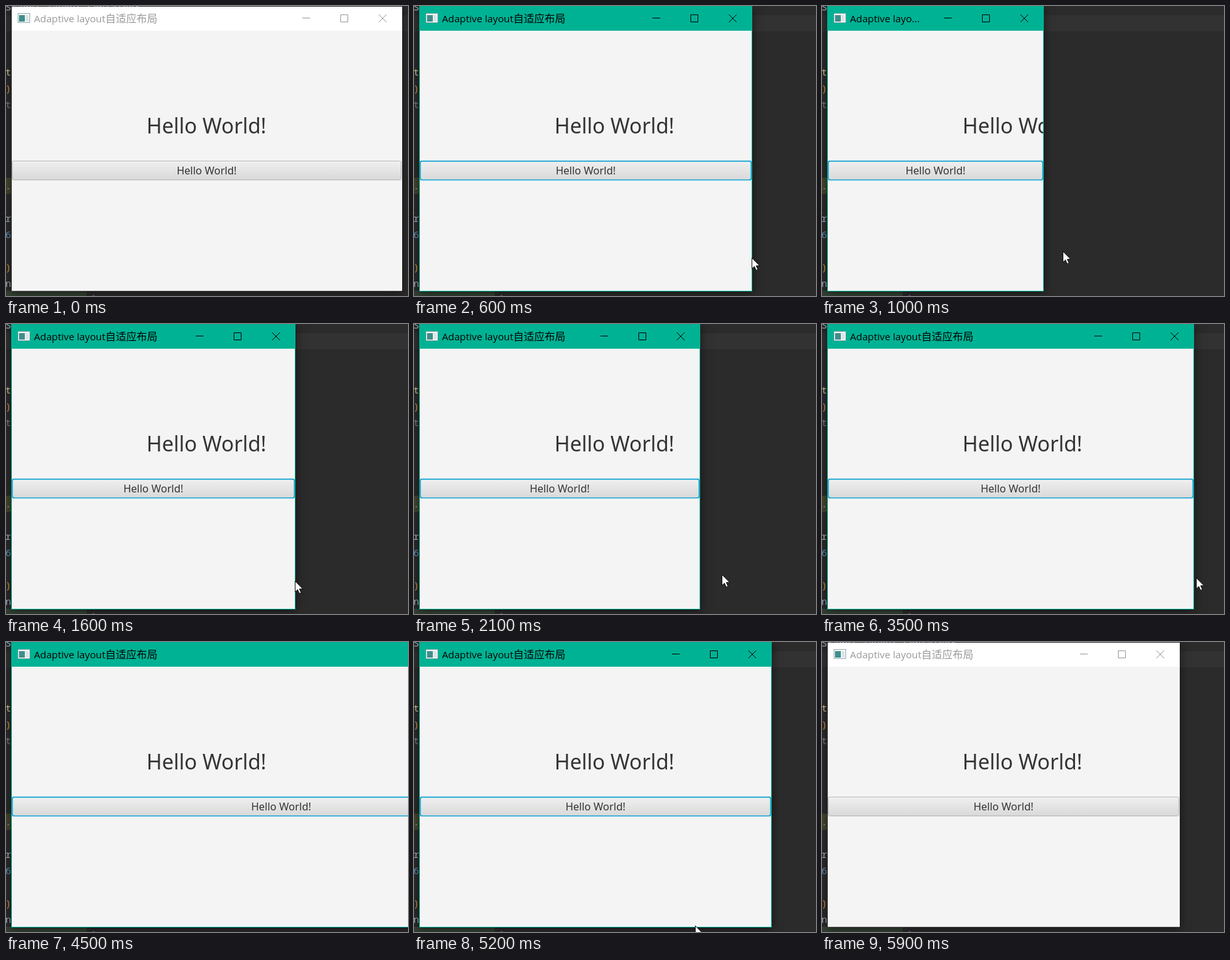
An HTML page with a canvas that plays this animation: 618x446 px, repeating every 6 s.

```html
<!DOCTYPE html>
<html lang="en">
<head>
<meta charset="utf-8">
<title>Adaptive layout</title>
<style>
  html, body { margin: 0; width: 100%; height: 100%; overflow: hidden; background: #2b2b2b; }
  canvas { display: block; }
</style>
</head>
<body>
<canvas id="stage" width="618" height="446"></canvas>
<script>
const ctx = document.getElementById('stage').getContext('2d');
const LOOP = 6000, STEP = 100;
const LEFT = 8, BOTTOM = 439, BAR = 38;
const TITLE = 'Adaptive layout自适应布局';
const LATIN = '15.2px "Open Sans", sans-serif';
const CJK = '16px "Noto Sans CJK SC", "Noto Sans CJK", sans-serif';
const BODY = '"Noto Sans", sans-serif';
const CODE = '15px "Noto Sans Mono", monospace';

// [time, right edge of the window]
const EDGE = [
  [400, 609], [500, 590], [600, 520], [700, 430], [800, 345], [900, 305],
  [1000, 341], [1100, 430], [1200, 530], [1300, 608], [1400, 600], [1500, 520],
  [1600, 445], [1700, 370], [1800, 300], [1900, 282], [2000, 340], [2200, 540],
  [2300, 605], [2400, 590], [2500, 500], [2600, 390], [2700, 314], [2800, 299],
  [3000, 450], [3100, 515], [3500, 572], [3600, 581], [3700, 627], [3900, 627],
  [4400, 815], [4500, 838], [4600, 700], [4700, 546], [4800, 550]
];
// [time, height of the pointer tip]
const POINTER_Y = [[400, 392], [1000, 377], [1600, 395], [2700, 373], [3500, 390], [4800, 392]];

// [text, baseline, colour]
const CODE_LINES = [
  ['Stage; layout.Container', 7, '#a9b7c6'],
  ['t)', 107, '#d8c690'], [');', 132, '#dc9a3c'], ['ti', 157, '#808080'],
  ['..', 282, '#a9a68a'], ['rF', 332, '#a9b7c6'], ['60', 357, '#6897bb'],
  [');', 407, '#dc9a3c'], ['ne', 432, '#a9b7c6']
];

function sample(keys, t) {
  const i = keys.findIndex(key => key[0] > t);
  if (i === 0) return keys[0][1];
  if (i < 0) return keys[keys.length - 1][1];
  const [t0, a] = keys[i - 1], [t1, b] = keys[i];
  return a + (b - a) * (t - t0) / (t1 - t0);
}

function rect(x, y, w, h, fill) {
  ctx.fillStyle = fill;
  ctx.fillRect(x, y, w, h);
}

function label(text, x, y, font, fill, align = 'left') {
  ctx.font = font;
  ctx.fillStyle = fill;
  ctx.textAlign = align;
  ctx.fillText(text, x, y);
}

function roundRect(x, y, w, h, r, fill) {
  ctx.fillStyle = fill;
  ctx.beginPath();
  ctx.roundRect(x, y, w, h, r);
  ctx.fill();
}

function drawEditor() {
  rect(0, 0, 618, 446, '#2b2b2b');
  rect(0, 14, 618, 25, '#323232');
  rect(0, 264, 9, 25, '#45452f');
  rect(0, 438, 124, 8, '#344134');
  for (const [text, y, fill] of CODE_LINES) label(text, -1, y, CODE, fill);
  rect(133, 445, 3, 1, '#777');
}

function drawTitle(limit, fill) {
  const runs = text => text.match(/[ -~]+|[^ -~]+/g) || [];
  const fontOf = run => run[0] <= '~' ? LATIN : CJK;
  const width = text => runs(text).reduce((sum, run) => {
    ctx.font = fontOf(run);
    return sum + ctx.measureText(run).width;
  }, 0);
  let text = TITLE;
  for (let n = TITLE.length - 1; n > 0 && width(text) > limit; n--) {
    text = TITLE.slice(0, n) + '...';
  }
  let x = 43;
  for (const run of runs(text)) {
    label(run, x, 25, fontOf(run), fill);
    x += ctx.measureText(run).width;
  }
}

function drawAppIcon() {
  rect(18, 11, 19, 15, '#8fa9ad');
  rect(19, 12, 17, 13, '#fff');
  rect(20, 14, 9, 10, '#3f8f8c');
  rect(30, 14, 5, 10, '#dde5e6');
}

function drawControls(right, stroke) {
  const min = right - 153.5, max = right - 94.5, close = right - 36;
  ctx.strokeStyle = stroke;
  ctx.lineWidth = 1;
  ctx.beginPath();
  ctx.moveTo(min, 18.5);
  ctx.lineTo(min + 12, 18.5);
  ctx.rect(max, 13.5, 11, 11);
  ctx.moveTo(close, 13);
  ctx.lineTo(close + 12, 25);
  ctx.moveTo(close + 12, 13);
  ctx.lineTo(close, 25);
  ctx.stroke();
}

function drawButton(right, active) {
  const x = LEFT + 1, w = right - 1 - x;
  const face = ctx.createLinearGradient(0, 239, 0, 267);
  face.addColorStop(0, '#efefef');
  face.addColorStop(1, '#d9d9d9');
  if (active) {
    roundRect(x - 1, 237, w + 2, 32, 4, 'rgba(3,158,211,.22)');
    roundRect(x, 238, w, 30, 3, '#0c9fd0');
    roundRect(x + 1.5, 239.5, w - 3, 27, 2, '#f6f6f6');
    roundRect(x + 2, 240.5, w - 4, 26, 2, face);
  } else {
    roundRect(x, 238, w, 30, 3, '#b4b4b4');
    roundRect(x + 1, 239, w - 2, 28, 2, '#f8f8f8');
    roundRect(x + 1, 240, w - 2, 27, 2, face);
  }
  label('Hello World!', x + w / 2, 259, '16px ' + BODY, '#333', 'center');
}

function drawWindow(right, active) {
  const top = active ? 0 : 1, w = right - LEFT;
  ctx.save();
  ctx.shadowColor = 'rgba(0,0,0,.55)';
  ctx.shadowBlur = 14;
  ctx.shadowOffsetY = 2;
  rect(LEFT, top, w, BOTTOM - top, active ? '#00b294' : '#4b4b4b');
  ctx.restore();

  ctx.save();
  ctx.beginPath();
  ctx.rect(LEFT + 1, top, w - (active ? 2 : 1), BOTTOM - 1 - top);
  ctx.clip();
  rect(LEFT, top, w, BAR - top, active ? '#00b294' : '#fff');
  rect(LEFT, BAR, w, BOTTOM, '#f4f4f4');
  drawAppIcon();
  drawTitle(right - 186 - 43, active ? '#000' : '#999');
  drawControls(right, active ? '#000' : '#999');
  label('Hello World!', 216, 196, '32px ' + BODY, '#333');
  drawButton(right, active);
  ctx.restore();
}

function drawPointer(x, y) {
  const shape = [[0, 0], [0, 16.5], [3.8, 13], [6.4, 19], [9.2, 17.8], [6.6, 12], [11.6, 11.8]];
  ctx.beginPath();
  for (const [dx, dy] of shape) ctx.lineTo(x + dx, y + dy);
  ctx.closePath();
  ctx.fillStyle = '#fff';
  ctx.fill();
  ctx.strokeStyle = '#111';
  ctx.lineWidth = 1;
  ctx.stroke();
}

function draw(now) {
  const t = Math.floor(now % LOOP / STEP) * STEP;
  const active = t >= 400 && t < 5900;
  const right = Math.round(sample(EDGE, t));
  drawEditor();
  drawWindow(right, active);
  if (active && t < 4800) {
    // The window trails the pointer while it grows.
    const x = Math.max(sample(EDGE, t + 33), right - 1);
    drawPointer(Math.round(x) + 0.5, Math.round(sample(POINTER_Y, t)) + 0.5);
  } else if (t >= 4800 && t < 5200) {
    drawPointer(555.5, 392.5);
  } else if (t === 5200) {
    drawPointer(432.5, 436.5);
  }
}

const start = performance.now();
function tick() {
  draw(performance.now() - start);
  requestAnimationFrame(tick);
}
tick();
</script>
</body>
</html>
```
